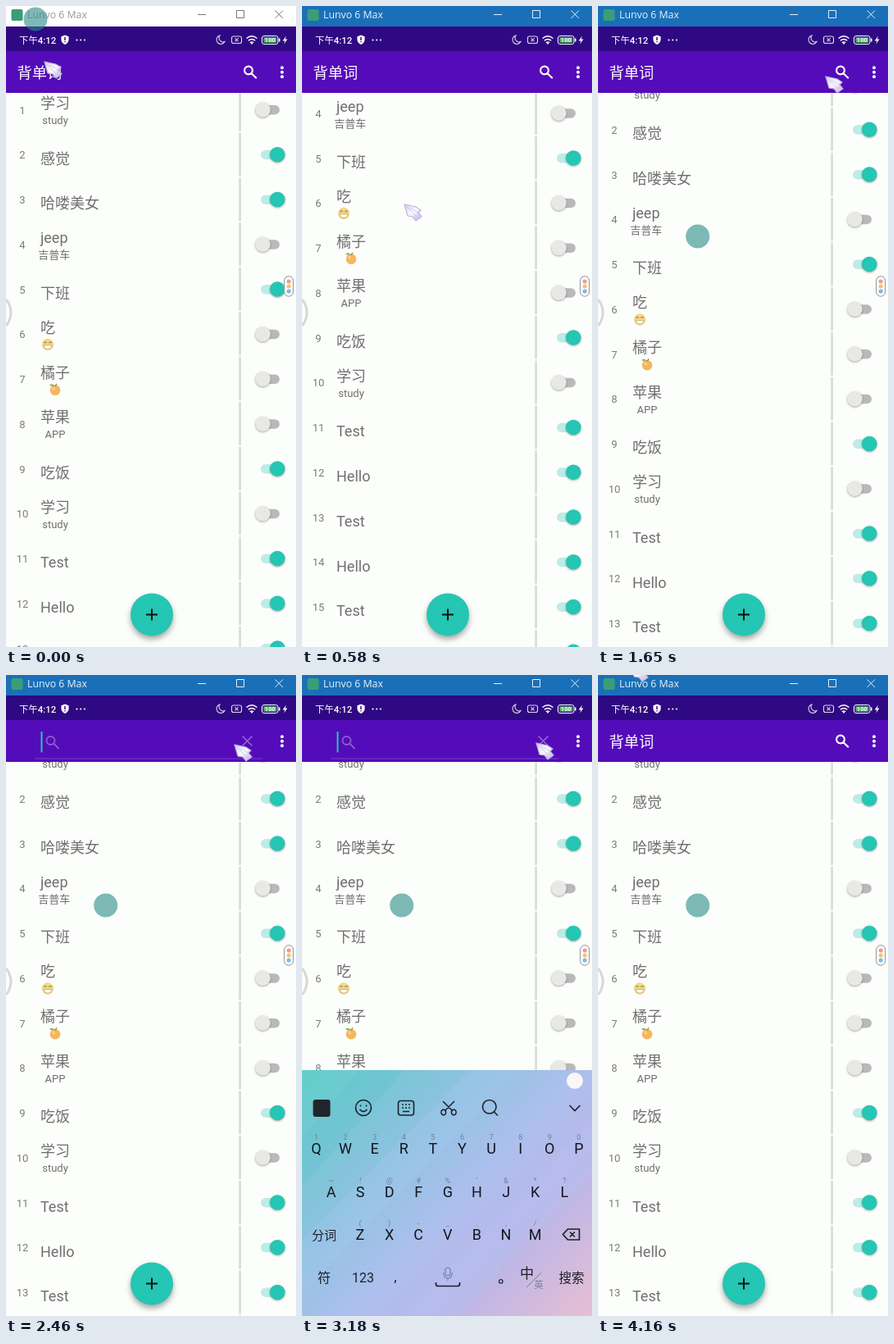
These frames come from a looping animation (354x782 px, 4.27 s). An HTML page with a canvas:

```html
<!DOCTYPE html>
<html lang="zh-CN">
<head>
<meta charset="utf-8">
<title>背单词</title>
<style>
html, body { margin: 0; width: 100%; height: 100%; overflow: hidden; background: #fcfefb; }
canvas { display: block; }
</style>
</head>
<body>
<canvas id="stage" width="354" height="782"></canvas>
<script>
const ctx = document.getElementById('stage').getContext('2d');
const LOOP = 4270, PITCH = 54.75, LIST_TOP = 106, TEAL = '#25c6b3';
const SANS = 'Roboto, "Noto Sans CJK SC", "Noto Sans CJK", sans-serif';

const ticks = [0, 90, 210, 330, 470, 580, 700, 810, 920, 1060, 1180, 1300, 1410, 1530, 1650, 1770,
  1880, 2000, 2110, 2230, 2350, 2460, 2690, 2810, 2920, 3040, 3180, 3300, 3410, 3530, 3670, 3810,
  3930, 4040, 4160];

// Keyframes: [time, value, ...]
const scrollKeys = [[90, 127], [330, 55], [580, -33], [810, 122], [920, 116], [1530, 96.5]];
const glowKeys = [[700, 0], [920, 1], [1180, 0]];
const pointerKeys = [[0, 47, 67], [330, 98, 175], [580, 125, 241], [920, 234, 170], [1300, 121, 281],
  [1650, 278, 85], [2460, 279, 84], [3180, 286, 82], [3670, 286, 82], [4160, 40, -13]];

const words = [['学习', 'study'], ['感觉'], ['哈喽美女'], ['jeep', '吉普车'], ['下班'], ['吃', grin],
  ['橘子', orange], ['苹果', 'APP'], ['吃饭'], ['学习', 'study']];
for (let i = 0; i < 8; i++) words.push([i % 2 ? 'Hello' : 'Test']);

function sample(keys, t) {
  const next = keys.findIndex(k => k[0] > t);
  if (next === 0) return keys[0].slice(1);
  if (next < 0) return keys[keys.length - 1].slice(1);
  const a = keys[next - 1], b = keys[next];
  const p = (t - a[0]) / (b[0] - a[0]), e = p * p * (3 - 2 * p);
  return a.slice(1).map((v, i) => v + (b[i + 1] - v) * e);
}

function text(str, x, y, size, color, align = 'left', weight = 400, family = SANS) {
  ctx.font = `${weight} ${size}px ${family}`;
  ctx.textAlign = align;
  ctx.fillStyle = color;
  ctx.fillText(str, x, y);
}

function rect(x, y, w, h, color) {
  ctx.fillStyle = color;
  ctx.fillRect(x, y, w, h);
}

function disc(x, y, r, color) {
  ctx.fillStyle = color;
  ctx.beginPath();
  ctx.arc(x, y, r, 0, 7);
  ctx.fill();
}

function pill(x, y, w, h, r, fill, stroke, width = 1) {
  ctx.beginPath();
  ctx.roundRect(x, y, w, h, r);
  if (fill) { ctx.fillStyle = fill; ctx.fill(); }
  if (stroke) { ctx.strokeStyle = stroke; ctx.lineWidth = width; ctx.stroke(); }
}

// SVG path drawn at x, y
function path(d, x, y, stroke, width = 1, fill) {
  ctx.save();
  ctx.translate(x, y);
  const p = new Path2D(d);
  if (fill) { ctx.fillStyle = fill; ctx.fill(p); }
  if (stroke) { ctx.strokeStyle = stroke; ctx.lineWidth = width; ctx.stroke(p); }
  ctx.restore();
}

function shadowed(dy, blur, alpha, draw) {
  ctx.save();
  ctx.shadowColor = `rgba(0,0,0,${alpha})`;
  ctx.shadowOffsetY = dy;
  ctx.shadowBlur = blur;
  draw();
  ctx.restore();
}

function grin(x, y) {
  disc(x, y, 7.2, '#f3d783');
  path('M-4.5 -2q1.5 -2 3 0M1.5 -2q1.5 -2 3 0', x, y, '#8d7150', 1.1);
  path('M-5 1H5Q4 5.5 0 5.5T-5 1z', x, y, '#b99c67', .7, '#fff');
}

function orange(x, y) {
  disc(x, y + 1, 6.3, '#f4b65e');
  disc(x - 2, y - 1, 2, '#f8cd88');
  path('M0 -4Q-4 -9 -7 -5Q-3 -3 0 -4', x, y, null, 0, '#9eb66b');
  path('M0 -4L2 -7', x, y, '#98784e', 1.2);
}

function toggle(y, on) {
  pill(311, y - 5.5, 23, 11.5, 6, on ? '#bdece6' : '#b9b9b9');
  shadowed(1, 2.5, .35, () => disc(on ? 331.3 : 313.5, y, 9.3, on ? TEAL : '#e8e8e7'));
}

function list(first) {
  words.forEach(([word, note], i) => {
    const y = first + i * PITCH;
    if (y < 70 || y > 820) return;
    text(i + 1, 20, y + 4.6, 13, '#7b7b7b', 'center');
    text(word, 42, y + (note ? -2 : 10.8), 18, '#6f6f6f');
    const mid = 42 + ctx.measureText(word).width / 2;
    if (typeof note === 'function') note(mid, y + 12.3);
    else if (note) text(note, mid, y + 16.8, 13, '#6f6f6f', 'center');
    rect(284.3, y - 27, 2.6, 52.7, '#d9dad9');
    toggle(y - .5, ![0, 3, 5, 6, 7, 9].includes(i));
  });
}

function edgeGlow(g) {
  if (g <= 0) return;
  disc(168, LIST_TOP + 33 * g - 870, 870, `rgba(90,20,190,${.1 * g})`);
}

function overlays() {
  shadowed(4, 7, .35, () => disc(178, 742.5, 26, TEAL));
  path('M-7 0H7M0 -7V7', 178, 742.5, '#111', 2);
}

function edgeHandles() {
  path('M0 0Q11 16 0 32', .5, 358, '#d6d8d6', 3);
  pill(339.7, 329.7, 11, 24.5, 5.5, '#fff', '#8d8d8d');
  ['#ee9b94', '#f3c56d', '#7fb9e6'].forEach((c, i) => disc(345.2, 336 + i * 6, 2.6, c));
}

function windowBar(active) {
  rect(0, 0, 354, 25, active ? '#1a70b8' : '#fff');
  pill(6.5, 4, 14, 14, 2, '#3a9d78');
  text('Lunvo 6 Max', 26, 15.3, 12.3, active ? '#e8f2fa' : '#9a9a9a', 'left', 400, '"Open Sans", sans-serif');
  path('M234 10.5H244M281.5 5.5H290.5V14.5H281.5zM328.5 5.5L338 15M338 5.5L328.5 15', 0, 0,
    active ? '#e3eef7' : '#777');
}

function statusBar() {
  rect(0, 25, 354, 30, '#2f0883');
  text('下午4:12', 16, 45.6, 11.4, '#fff', 'left', 500);
  path('M0 -5.5L4.6 -3.7V0Q4.2 4 0 6Q-4.2 4 -4.6 0V-3.7z', 72, 41, null, 0, '#fff');
  path('M0 -3V1M0 2V3.2', 72, 41, '#2f0883', 1.5);
  for (let i = 0; i < 3; i++) disc(86.5 + i * 4.7, 41.5, 1.1, '#fff');
  path('M-1 -5A5.3 5.3 0 1 0 5 2.5A5 5 0 0 1 -1 -5z', 262, 41, '#ddd', 1.1);
  pill(275.5, 37, 12, 8.5, 2, null, '#ddd', 1.1);
  path('M-2 -2L2 2M2 -2L-2 2', 281.5, 41.3, '#ddd', 1.1);
  path('M-6.5 -2Q0 -7.5 6.5 -2M-4.3 .8Q0 -3 4.3 .8M-2.2 3.2Q0 1.5 2.2 3.2', 300, 41.5, '#fff', 1.4);
  disc(300, 45.6, 1.1, '#fff');
  pill(312.5, 36.5, 19.5, 10, 2.5, '#2f0883', '#fff');
  pill(314.3, 38.2, 16, 6.6, 1, '#4bb35f');
  text('100', 322.3, 44.4, 7.5, '#fff', 'center', 700);
  rect(333, 39.5, 1.5, 4, '#fff');
  path('M1.5 -5L-2.8 1H0L-1.2 5L3 -1H.3z', 340.5, 41.5, null, 0, '#fff');
}

function magnifier(x, y, r, color, width) {
  path(`M${r} 0A${r} ${r} 0 1 1 ${-r} 0A${r} ${r} 0 1 1 ${r} 0M${r * .7} ${r * .7}L${r * 2} ${r * 2}`,
    x, y, color, width);
}

function appBar(searching, t) {
  rect(0, 54.5, 354, LIST_TOP - 54.5, '#540bb9');
  for (let i = 0; i < 3; i++) disc(337, 75.3 + i * 5.5, 2, '#fff');
  if (!searching) {
    text('背单词', 13.5, 88, 18.2, '#fff', 'left', 500);
    magnifier(296, 78.5, 4.9, '#fff', 2.1);
    return;
  }
  magnifier(54.5, 80, 5, '#8d5bd0', 1.9);
  path('M-6 -6L6 6M6 -6L-6 6', 294.5, 80.5, '#9565d6', 1.6);
  rect(35, 101.5, 278, 1, '#7b41ca');
  if ((t + 820) % 1000 < 500) rect(42.5, 69, 2, 25.5, TEAL);
}

function keyRow(keys, hints, x, y) {
  [...keys].forEach((k, i) => {
    text(k, x + i * 35.6, y + 6.3, 18, '#14161c', 'center');
    text(hints[i], x + i * 35.6, y - 11, 9, '#6f7f9c', 'center');
  });
}

function keyboard() {
  const ink = '#1d2028';
  const bg = ctx.createLinearGradient(0, 482, 330, 800);
  [[0, '#5fcfc9'], [.28, '#86c3dc'], [.55, '#aebfee'], [.72, '#b9b6e8'], [1, '#e6bed4']]
    .forEach(([p, c]) => bg.addColorStop(p, c));
  rect(0, 482, 354, 300, bg);
  path('M0 690L205 482H265L0 755zM120 782L354 545V610L185 782z', 0, 0, null, 0, 'rgba(180,205,255,.16)');
  path('M0 565L70 482H125L0 625z', 0, 0, null, 0, 'rgba(70,175,200,.14)');
  disc(333, 495, 10, '#fbf7f4');

  pill(13.5, 518, 21, 21, 3, '#20242c');
  pill(65.5, 518.5, 19, 19, 9.5, null, ink, 1.6);
  path('M-4.5 2Q0 7 4.5 2M-3.5 -3.5V-1.5M3.5 -3.5V-1.5', 75, 528, ink, 1.6);
  pill(117.5, 519.5, 19, 17.5, 3, null, ink, 1.6);
  path('M-5 -4H-3M-1 -4H1M3 -4H5M-5 0H-3M-1 0H1M3 0H5M-4 4.5H4', 127, 528, ink, 1.6);
  path('M-7 -8L5 4M7 -8L-5 4M-3.5 5.5A2.8 2.8 0 1 1 -9 5.5A2.8 2.8 0 1 1 -3.5 5.5M9 5.5A2.8 2.8 0 1 1 3.5 5.5A2.8 2.8 0 1 1 9 5.5',
    179, 528, ink, 1.5);
  pill(220.5, 518.5, 16.5, 16.5, 8.3, null, ink, 1.6);
  path('M234.5 533L239 537.5M326.5 525L333 531.5L339.5 525', 0, 0, ink, 1.6);

  keyRow('QWERTYUIOP', '1234567890', 17.5, 578);
  keyRow('ASDFGHJKL', "~!@#%'&*?", 35.5, 631);
  keyRow('ZXCVBNM', '()-_:;/', 71, 683);
  text('分词', 27, 688.5, 15, ink, 'center', 500);
  path('M-10 0L-4 -6.5H10V6.5H-4zM-1.5 -3L4.5 3M4.5 -3L-1.5 3', 328.5, 682.5, ink, 1.7);

  text('符', 27, 741, 16, ink, 'center', 500);
  text('123', 74.5, 741, 16, ink, 'center');
  text(',', 114, 740, 17, ink, 'center');
  pill(175, 723, 6, 10, 3, null, '#75809f', 1.2);
  path('M172.5 729Q173 736 178 736T183.5 729M178 736V739', 0, 0, '#75809f', 1.2);
  path('M163.5 741V743Q163.5 745.5 166 745.5H190Q192.500 745.5 192.500 743V741', 0, 0, ink, 1.7);
  pill(240.5, 737.5, 4.5, 4.5, 2.3, null, ink, 1.2);
  text('中', 274.5, 735.5, 17, ink, 'center', 500);
  text('英', 289, 748, 11.5, '#7681a0', 'center');
  path('M274 747L292 729', 0, 0, '#7681a0', 1);
  text('搜索', 329, 740.5, 15.5, ink, 'center', 500);
}

function pointer(x, y) {
  const shine = ctx.createLinearGradient(0, 0, 18, 20);
  [[0, '#bfc4f2'], [.35, '#f6e9fb'], [.6, '#fdf6fd'], [.8, '#e3c9f0'], [1, '#a9dcea']]
    .forEach(([p, c]) => shine.addColorStop(p, c));
  path('M0 1L14 4L20 8L17 11L21 16L14 21L10 16L4 15z', x, y, '#b9b3df', 1.2, shine);
  path('M3 4L14 15M6 5L17 11', x, y, 'rgba(165,200,232,.7)', 1);
}

function draw(t) {
  const [first] = sample(scrollKeys, t), [glow] = sample(glowKeys, t);
  rect(0, 0, 354, 782, '#fcfefb');
  list(first);
  edgeGlow(glow);
  overlays();
  appBar(t >= 2230 && t < 3670, t);
  statusBar();
  windowBar(t >= 90);
  edgeHandles();
  if (t >= 3180 && t < 3670) keyboard();
  const touch = 'rgba(40,138,135,.6)';
  if (t < 210) disc(36, 16, 14.5, touch);
  if (t >= 1300) disc(121.7, 281, 14.5, touch);
  pointer(...sample(pointerKeys, t));
}

function loop() {
  const now = performance.now() % LOOP;
  draw(ticks.findLast(tick => tick <= now));
  requestAnimationFrame(loop);
}
loop();
</script>
</body>
</html>
```
